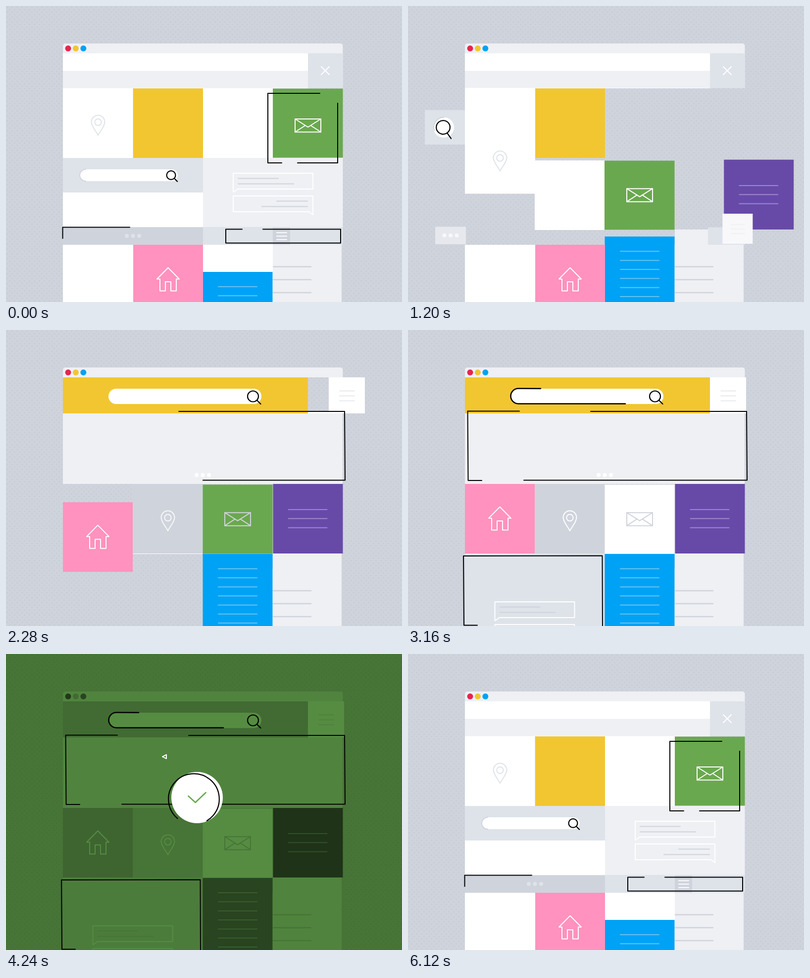
An HTML page with a canvas for the animation above (6320 ms loop, 800 px wide and 600 px high).

```html
<!DOCTYPE html>
<html lang="en">
<head>
<meta charset="utf-8">
<title>Page layout animation</title>
<style>
  html, body { margin: 0; width: 100%; height: 100%; overflow: hidden; background: #cfd3dc; }
  canvas { display: block; width: 800px; height: 600px; }
</style>
</head>
<body>
<canvas id="stage" width="800" height="600"></canvas>
<script>
const ctx = document.getElementById('stage').getContext('2d');
const LOOP = 6320, STEP = 40, SWAP = 5100, TAU = Math.PI * 2, TILE = 141;
const WHITE = '#ffffff', PALE = '#eff0f4', LIGHT = '#dee3ea', GREY = '#cfd3dc', BLACK = '#000000',
  YELLOW = '#f2c631', GREEN = '#6aa84f', PURPLE = '#674aa8', BLUE = '#00a2f6', PINK = '#ff92be';

let t = 0;

// Timing
const clamp = u => Math.min(1, Math.max(0, u));
const ramp = (a, b) => { const u = clamp((t - a) / (b - a)); return u * u * (3 - 2 * u); };
// Progress of a step towards the second layout; everything resets at SWAP.
const go = (a, b) => t < SWAP ? ramp(a, b) : 0;
// Share of the entry offset still left after SWAP.
const back = () => t < SWAP ? 0 : (1 - clamp((t - SWAP) / 500)) ** 3;
const mix = (a, b, u) => a + (b - a) * u;
const blend = (a, b, u) => {
  const part = i => Math.round(mix(parseInt(a.slice(i, i + 2), 16), parseInt(b.slice(i, i + 2), 16), u));
  return '#' + [1, 3, 5].map(i => part(i).toString(16).padStart(2, '0')).join('');
};

// Drawing helpers
function rect(color, x, y, w, h) {
  ctx.fillStyle = color;
  ctx.fillRect(x, y, Math.max(0, w), Math.max(0, h));
}
function round(color, x, y, w, h, radius) {
  ctx.fillStyle = color;
  ctx.beginPath();
  ctx.roundRect(x, y, w, h, radius);
  ctx.fill();
}
const disc = (color, x, y, r) => round(color, x - r, y - r, 2 * r, 2 * r, r);
function stroke(color, width = 2) {
  ctx.strokeStyle = color;
  ctx.lineWidth = width;
  ctx.stroke();
}
function arc(color, width, x, y, r, from = 0, to = TAU) {
  ctx.beginPath();
  ctx.arc(x, y, r, from, to);
  stroke(color, width);
}
function trace(points, close) {
  ctx.beginPath();
  points.forEach(([x, y]) => ctx.lineTo(x, y));
  if (close) ctx.closePath();
}
function line(color, width, points, close) {
  trace(points, close);
  stroke(color, width);
}
function rows(color, width, x, y, w, count = 1, gap = 0) {
  for (let i = 0; i < count; i++) line(color, width, [[x, y + i * gap], [x + w, y + i * gap]]);
}
function placed(x, y, draw, angle = 0) {
  ctx.save();
  ctx.translate(x, y);
  ctx.rotate(angle);
  draw();
  ctx.restore();
}
// Strokes the current path between two distances along it.
function strokePart(from, to, width = 2, color = BLACK) {
  if (to - from < 0.5) return;
  ctx.setLineDash([to - from, 1e5]);
  ctx.lineDashOffset = -from;
  stroke(color, width);
  ctx.setLineDash([]);
}
const span = points => points.slice(1).reduce(
  (sum, [x, y], i) => sum + Math.hypot(x - points[i][0], y - points[i][1]), 0);
// Strokes the share from..to of a polyline.
function part(points, from, to, dx = 0, dy = 0) {
  const len = span(points);
  trace(points.map(([x, y]) => [x + dx, y + dy]));
  strokePart(from * len, to * len);
}

// Icons
function envelope(color) {
  const w = 26, top = -13.5, low = 13;
  line(color, 2, [[-w, top], [w, top], [w, low], [-w, low]], true);
  line(color, 2, [[-w, top], [0, 3], [w, top]]);
  [-1, 1].forEach(side => line(color, 2, [[side * w, low], [side * 6, 0]]));
}
function house() {
  const half = [[0, -23], [22.5, 0], [16.5, 0], [16.5, 24], [5.5, 24], [5.5, 5.5]];
  line(WHITE, 2, [...half, ...half.map(([x, y]) => [-x, y]).reverse()], true);
}
// The origin is the tip.
function marker(color) {
  ctx.beginPath();
  ctx.moveTo(0, 0);
  ctx.bezierCurveTo(-5, -10, -13.5, -18, -13.5, -27);
  ctx.arc(0, -27, 13.5, Math.PI, 0);
  ctx.bezierCurveTo(13.5, -18, 5, -10, 0, 0);
  stroke(color);
  arc(color, 2, 0, -26.5, 6.7);
}
function bubbles() {
  line(WHITE, 2, [[0, 0], [161, 0], [161, 32], [9, 32], [1, 38], [0, 38]], true);
  rows(GREY, 2, 10, 10.5, 81);
  rows(GREY, 2, 10, 21.5, 112);
  line(WHITE, 2, [[0, 46], [161, 46], [161, 84], [153, 78], [0, 78]], true);
  rows(GREY, 2, 88, 56.5, 62);
  rows(GREY, 2, 58, 67.5, 92);
}

const tile = document.createElement('canvas');
tile.width = tile.height = 10;
const tileCtx = tile.getContext('2d');
tileCtx.fillStyle = 'rgba(60,70,60,.045)';
[2.5, 7.5].forEach(p => { tileCtx.beginPath(); tileCtx.arc(p, p, 1.5, 0, TAU); tileCtx.fill(); });
const dotPattern = ctx.createPattern(tile, 'repeat');

// Page parts
function backdrop() {
  rect(t < SWAP ? GREY : blend(YELLOW, GREY, ramp(5380, 5600)), 0, 0, 800, 600);
  rect(dotPattern, 0, 0, 800, 600);
}

function header() {
  const closeX = mix(610, 820, go(1680, 2000));
  const whiteX = mix(115, 820, go(1620, 2010)), greyX = mix(115, 820, go(1570, 1980));
  rect(WHITE, whiteX, 96, closeX - whiteX, 71);
  rect(PALE, greyX, 131.5, closeX - greyX, 35);
  rect(LIGHT, closeX, 96, 71, 70.5);
  [-8, 8].forEach(d => line(WHITE, 2, [[closeX + 35 - d, 123], [closeX + 35 + d, 139]]));
}

function chat() {
  const out = go(400, 840), x = 398 + 432 * out + 51 * back(), y = 307 + 7 * out;
  rect(PALE, x, y, 282.5, 141.5);
  placed(x + 61, y + 32, bubbles);
}

function mailOffset() {
  return [-142 * go(600, 920), 146 * go(80, 600)];
}
function mail() {
  const [dx, dy] = mailOffset(), x = 539 + dx - 182 * back(), y = 167 + dy;
  const color = t < SWAP ? blend(GREEN, WHITE, go(2400, 2700)) : blend(PALE, GREEN, ramp(5560, 5900));
  rect(WHITE, x - TILE, y, TILE, TILE);
  rect(LIGHT, 115, 448.5, 0, 0);
  return () => {
    rect(color, x, y + .5, TILE + .5, 140);
    placed(x + 71, y + 75.5 - dy / 30, () => envelope(blend(WHITE, GREY, go(1200, 1500))));
  };
}

function strip() {
  const w = 565.5 * (1 - go(860, 1300));
  rect(LIGHT, 680.5 - w, 448.5, w, 35.5);
}

function columns() {
  rect(PALE, 539, 453, 139, 147);
  rows(GREY, 2.5, 540, 528.5, 76, 3, 26.2);
  rect(WHITE, 398, 484, TILE, 116);
}
function blueColumn() {
  const y = 539 - 85 * go(900, 1300);
  rect(BLUE, 397.5, y, TILE, 146);
  rows('#66c2ee', 2, 429, y + 30, 78, 7, 18.35);
}

function purpleTile() {
  const x = mix(820, 539.5, go(900, 1400));
  rect(PURPLE, x, 311.5, TILE, TILE + .5);
  rows('#9a87cc', 2, x + 31, 364, 78, 3, 18.35);
}

function pinTile() {
  const slide = go(1560, 1836), x = mix(115, 256, slide) + 380 * back(), y = mix(167, 312, go(1000, 1400));
  const swing = -.14 * Math.sin(Math.PI * clamp((t - 1560) / 276));
  rect(blend(WHITE, GREY, go(1200, 1500)), x, y, TILE + .5, TILE);
  placed(x + 71, y + 95, () => marker(blend(LIGHT, WHITE, go(2000, 2400))), swing);
}

function homeTile() {
  const x = mix(257, 115, go(1700, 2000)), y = mix(484, 312, go(2000, 2400));
  rect(WHITE, 115, 484, x - 115, 116);
  rect(PINK, x, y, TILE, TILE);
  placed(x + 70.5, y + 69.5, house);
}

function heroAndYellow() {
  const push = go(1280, 2020);
  if (t < SWAP) rect(YELLOW, 257 + 553 * push, 167 + 8 * push, TILE, TILE);
  if (go(1000, 1400)) rect(WHITE, 115, 166, mix(142, 565, go(1300, 1883)), 146);
}

function talk() {
  const y = mix(604, 453, go(2350, 2750));
  rect(LIGHT, 115, y, 282, 150);
  placed(175.5, y + 98, bubbles);
}

function pager() {
  const out = go(720, 1180), up = go(1180, 1600), open = go(1740, 2260), tint = go(1000, 1300);
  const x = mix(mix(115, 55, out), 115, open) + 314 * back(), y = mix(mix(448.5, 286, up), 169, open);
  const w = mix(mix(283, 62, out), 565, open), h = mix(35.5, 143, open);
  rect(blend(GREY, PALE, tint), x, y, w, h);
  [-12.5, 0, 12.5].forEach(d => disc(blend(LIGHT, WHITE, tint), x + w / 2 + d, y + h - 18, 4));
}

function search() {
  const narrow = go(600, 914), fold = go(800, 1080), open = go(1740, 2240);
  const x = mix(mix(115, 34, fold), 115, open);
  const y = mix(mix(308, 99, go(1000, 1420)), 96, open) - 180 * back();
  const w = mix(mix(283, 81, narrow), 495, open), h = mix(70, 73, open);
  rect(blend(LIGHT, YELLOW, go(1800, 2200)), x, y, w, h);

  const left = x + mix(mix(33, 17, go(520, 920)), 92, open);
  const right = x + w - mix(mix(51, 22, fold), 94, open);
  const size = mix(mix(24, 41, fold), 31, open), mid = y + h / 2 + 2 * open;
  round(WHITE, left, mid - size / 2, right - left, size, size / 2);
  ctx.globalAlpha = 1 - open;
  arc(GREY, 2, left + size / 2 + 1, mid, size / 2, Math.PI * (.5 + .4 * fold), Math.PI * 1.5);
  ctx.globalAlpha = 1;

  const r = size * .29 + 2, turn = Math.PI / 4 * (1 + go(1080, 1480) - open);
  placed(right - size / 2 - 1.5, mid, () => {
    arc(BLACK, 2.2, 0, 0, r);
    line(BLACK, 2.2, [[r, 0], [2 * r, 0]]);
  }, turn);
}

function menu() {
  const grow = go(700, 1500);
  const x = mix(mix(539, 680, grow), 610, go(2150, 2450)) + 142 * back();
  const y = mix(mix(449, 408, grow), 96, go(1740, 2150)), size = mix(35, 73, grow);
  const gap = mix(7, 10, grow), w = gap * 2.9, tint = go(900, 1300);
  rect(blend(GREY, WHITE, tint), x, y, size, size);
  rows(blend(WHITE, PALE, tint), 2 + grow, x + size / 2 + .5 - w / 2, y + size / 2 + grow - gap, w, 3, gap);
}

function titleBar() {
  round(PALE, 115, 76, 565.5, 20, [5, 5, 0, 0]);
  ['#e8254e', YELLOW, BLUE].forEach((color, i) => disc(color, 125.5 + i * 15.4, 86, 6));
}

function outlines() {
  const cut = go(440, 880), left = back(), [dx, dy] = mailOffset();
  const mx = dx - 230 * left, my = dy * .966;
  part([[634, 177], [529, 177], [529, 318], [557, 318]], cut, 1, mx, my);
  part([[589, 318], [670, 318], [670, 197]], cut, 1, mx, my);
  part([[114.5, 471], [114.5, 448.5], [250, 448.5]], 0, 1 - cut, 314 * left, -24 * left);
  part([[477, 452.5], [444, 452.5], [444, 480.5], [676, 480.5], [676, 452.5], [519, 452.5]],
    0, 1 - go(680, 1060), 193 * left - 60 * go(600, 956));

  part([[69.5, 304.5], [83.5, 304.5]], 0, go(1560, 1720) - go(1720, 1900));
  part([[225, 164.5], [120.5, 164.5], [121.5, 305], [149, 305]], 0, go(2300, 3000));
  part([[303, 165], [684, 165], [685, 304.5], [234, 304.5]], .068 * go(1720, 2600), go(1600, 2520));
  part([[140, 598.5], [113, 598.5], [112, 458], [392.5, 457.5], [393, 602]], 0, go(2640, 3120));
  ctx.beginPath();
  ctx.moveTo(268, 118.7);
  ctx.arc(223, 134, 15.5, -Math.PI / 2, Math.PI / 2, true);
  ctx.lineTo(439, 149.5);
  strokePart(0, 311 * go(2500, 3100), 2.5);
}

function greenTint() {
  ctx.save();
  ctx.globalAlpha = go(3160, 3480);
  ctx.globalCompositeOperation = 'saturation';
  rect('#888888', 0, 0, 800, 600);
  ctx.globalCompositeOperation = 'multiply';
  rect('#558c42', 0, 0, 800, 600);
  ctx.restore();
}

function burst() {
  for (let i = 0; i < 6; i++) {
    const u = (t - 3800) / (560 / (1 + .3 * i));
    if (u < 0 || u >= 1) continue;
    const angle = 4.04 + i * TAU / 6, far = (107 + 52 * Math.max(0, Math.cos(angle))) * (1 - (1 - u) ** 3);
    const x = 386 + far * Math.cos(angle), y = 291 + far * Math.sin(angle), r = 4 * clamp((1 - u) * 5);
    if (i % 2) arc(WHITE, 2, x, y, r);
    else line(WHITE, 2, [[x - r, y], [x + r, y - r], [x + r, y + r]], true);
  }
}

function badge() {
  if (t < 3480 || t >= SWAP) return;
  burst();
  const u = clamp((t - 3480) / 400) - 1;
  disc(WHITE, 386, 291, 52 * Math.max(0, 1 + 2.7 * u ** 3 + 1.7 * u * u));
  const check = [[368.5, 288], [382.5, 301], [403.5, 281]];
  trace(check);
  strokePart(0, span(check) * ramp(3720, 3960), 2.6, GREEN);
  const open = ramp(4480, 4800), from = 130 + 45 * open, to = 130 + 289 * ramp(3800, 4200) - 54 * open;
  if (to > from) arc(BLACK, 2.2, 379.5, 294, 51.3, from * TAU / 360, to * TAU / 360);
}

// Grows from the purple tile to the full stage, then shrinks into the yellow tile.
function cover() {
  if (t < 5000) return;
  const grow = ramp(4960, 5080), rest = 1 - clamp((t - 5110) / 310);
  const edge = (from, full, to, power) => mix(to, mix(from, full, grow), rest ** power);
  const left = edge(539, 0, 257, 4), top = edge(311, 0, 167, 8);
  const right = edge(680, 800, 398, 3.4), bottom = edge(453, 600, 308, 4);
  const color = blend(blend('#1f301a', PURPLE, ramp(4960, 5060)), YELLOW, ramp(5400, 5600));
  rect(color, left, top, right - left, bottom - top);
}

function render() {
  ctx.lineCap = ctx.lineJoin = 'round';
  backdrop();
  columns();
  header();
  chat();
  rect(WHITE, 115, 308, 283 * (1 - go(760, 1150)), 140.5);
  const mailFront = mail();
  strip();
  mailFront();
  blueColumn();
  purpleTile();
  heroAndYellow();
  pinTile();
  homeTile();
  talk();
  pager();
  search();
  menu();
  titleBar();
  outlines();
  greenTint();
  badge();
  cover();
}

const start = performance.now();
function tick() {
  t = Math.floor((performance.now() - start) % LOOP / STEP) * STEP;
  render();
  requestAnimationFrame(tick);
}
tick();
</script>
</body>
</html>
```
